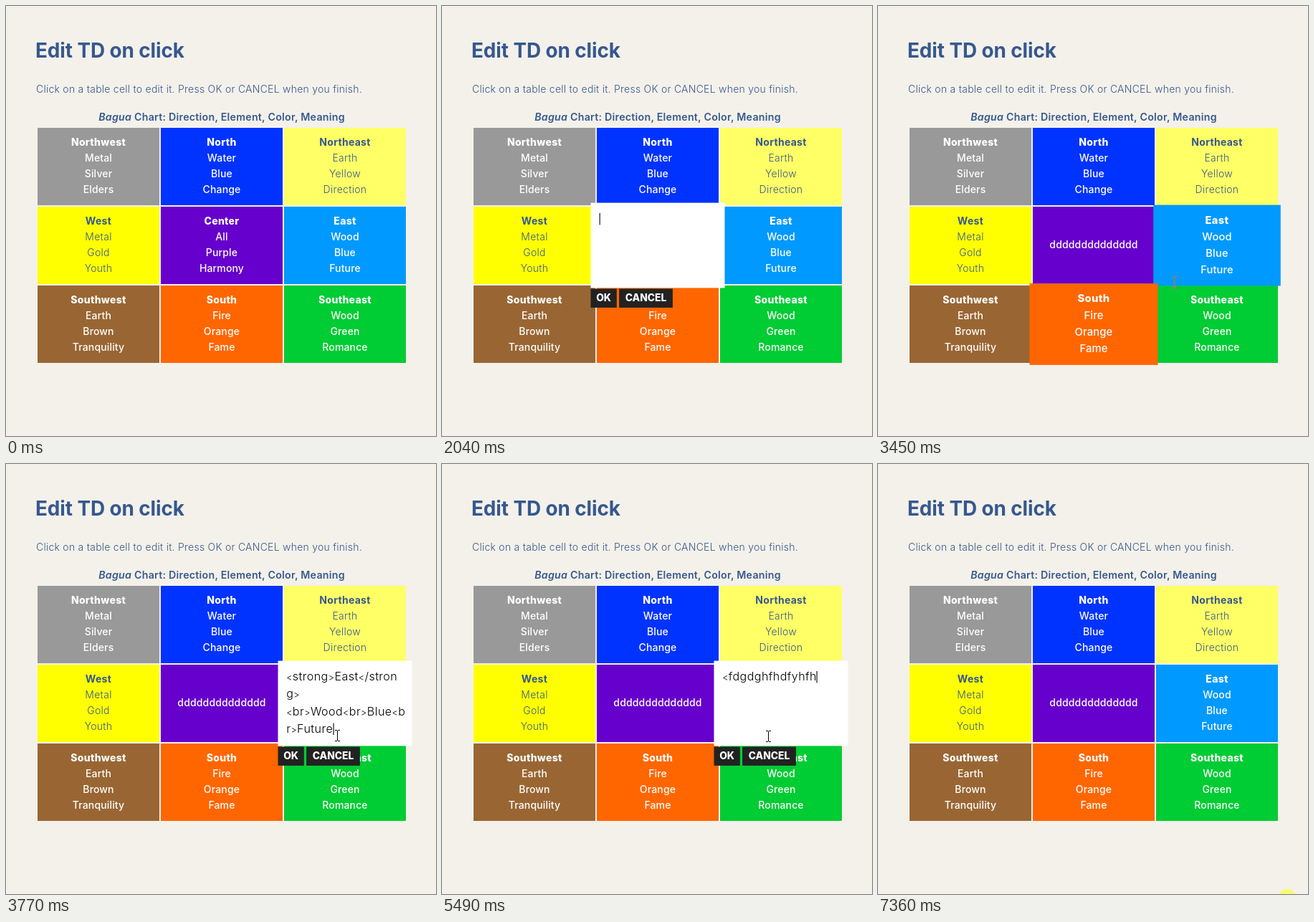
An HTML page for the animation above (7.43 s loop, 600 by 600 pixels).

```html
<!DOCTYPE html>
<html lang="en">
<head>
<meta charset="utf-8">
<title>Edit TD on click</title>
<style>
  html, body { margin: 0; width: 100%; height: 100%; overflow: hidden; background: #f4f1ea; }
  #stage {
    position: relative; width: 600px; height: 600px; overflow: hidden;
    background: #f4f1ea; color: #35588f; isolation: isolate;
    font: 300 14px/22px Inter, "Open Sans", sans-serif;
  }
  #stage > * { position: absolute; margin: 0; white-space: nowrap; }
  h1 { left: 41px; top: 42px; font-size: 27.9px; line-height: 40px; font-weight: 700; letter-spacing: -.1px; }
  .intro { left: 42px; top: 105px; letter-spacing: .245px; }
  .caption { left: 44px; top: 144px; width: 514px; text-align: center; font-size: 14.2px; font-weight: 600; letter-spacing: .26px; }
  .cell {
    width: 170px; height: 108px; box-sizing: border-box; padding-bottom: 2px;
    display: flex; flex-direction: column; justify-content: center;
    text-align: center; letter-spacing: .3px;
  }
  .cell b { font-weight: 700; letter-spacing: .3px; }
  .light { color: #fff; font-weight: 500; letter-spacing: .15px; }
  .light b { font-weight: 800; }
  #editor { width: 170px; height: 108px; transform: scale(1.1); z-index: 200; background: #fff; }
  #text { position: absolute; left: 10.6px; top: 9px; color: #000; font-size: 14.6px; letter-spacing: .4px; }
  #text div { height: 22px; }
  #text i { font-style: normal; font-size: 11.5px; }
  #text mark { background: #0078d7; color: #fff; }
  #text .wrap { padding-right: 4px; }
  #text u { display: inline-block; width: 1px; height: 15px; margin-right: -1px; background: #000; vertical-align: -3px; }
  .button {
    position: absolute; top: 108.5px; height: 24.5px; line-height: 24.5px;
    background: #222; color: #fff; font-size: 12.6px; font-weight: 800; text-align: center;
  }
  .ok { left: 0; width: 33px; }
  .cancel { left: 36px; width: 68px; }
  #stage > svg { left: 0; top: 0; z-index: 300; overflow: visible; }
  #beam { mix-blend-mode: difference; }
  #dot { left: 559px; top: 593px; width: 24px; height: 24px; border-radius: 50%; background: #fafa6e; }
</style>
</head>
<body>
<div id="stage">
  <h1>Edit TD on click</h1>
  <p class="intro">Click on a table cell to edit it. Press OK or CANCEL when you finish.</p>
  <p class="caption"><em>Bagua</em> Chart: Direction, Element, Color, Meaning</p>
  <div id="editor">
    <div id="text"></div>
    <span class="button ok">OK</span><span class="button cancel">CANCEL</span>
  </div>
  <div id="dot"></div>
  <svg id="beam" width="7" height="16"><path d="M0 .5h3M4 .5h3M3.5 1v14M0 15.5h3M4 15.5h3" fill="none" stroke="#fff"/></svg>
  <svg id="arrow" width="12" height="19"><path d="M.5.5V16.5L4.2 13 6.6 18.4 9 17.4 6.7 12H11.5Z" fill="#fff" stroke="#000"/></svg>
</div>
<script>
const LOOP = 7430, FADE = 300;
const $ = id => document.getElementById(id);
const clamp = (v, lo, hi) => Math.min(hi, Math.max(lo, v));
const show = (el, on) => { el.style.visibility = on ? 'visible' : 'hidden'; };

// name, other lines, background, light text, times at which hover flips
const CELLS = [
  ['Northwest', 'Metal Silver Elders', '#999999', 1, []],
  ['North', 'Water Blue Change', '#0033ff', 1, []],
  ['Northeast', 'Earth Yellow Direction', '#ffff66', 0, []],
  ['West', 'Metal Gold Youth', '#ffff00', 0, []],
  ['Center', 'All Purple Harmony', '#6600cc', 1, [590, 3130]],
  ['East', 'Wood Blue Future', '#0099ff', 1, [3370, 6140]],
  ['Southwest', 'Earth Brown Tranquility', '#996633', 1, []],
  ['South', 'Fire Orange Fame', '#ff6600', 1, [500, 590, 3130, 3370]],
  ['Southeast', 'Wood Green Romance', '#00cc33', 1, [6140, 6690]]
];

const cells = CELLS.map(([name, rest, color, light, flips], i) => {
  const el = document.createElement('div');
  el.className = light ? 'cell light' : 'cell';
  el.style.cssText = `left:${44 + i % 3 * 172}px;top:${170 + Math.floor(i / 3) * 110}px;background:${color}`;
  const full = `<b>${name}</b>` + rest.split(' ').map(s => `<span>${s}</span>`).join('');
  el.innerHTML = full;
  $('stage').insertBefore(el, $('editor'));
  return { el, flips, full };
});
const center = cells[4], east = cells[5];

// cursor waypoints: time, x, y
const TRACK = [
  [430, 447, 575], [510, 380, 497], [590, 318, 389], [680, 291, 369],
  [1060, 291, 369], [1230, 314, 346], [1370, 309, 354],
  [2740, 309, 354], [2960, 236, 405], [3130, 236, 406],
  [3370, 387, 394], [3580, 455, 372], [3770, 462, 379], [3820, 466, 394], [3880, 466, 409],
  [4020, 466, 409], [4300, 453, 372], [4580, 395, 300],
  [5300, 395, 300], [5470, 455, 380], [5650, 455, 380], [5800, 458, 405], [5820, 459, 406],
  [6540, 459, 407], [6700, 530, 503], [6850, 560, 560], [7060, 571, 606]
];

const CENTER = ['<strong>Center</str', 'ong>', '<br>All<br>Purple<br', '>Harmony'];
const EAST = ['<strong>East</stron', 'g>', '<br>Wood<br>Blue<b', 'r>Future'];
const TYPED = 'fdgdghfhdfyhfhdgf';
const keyTime = i => i < 3 ? 4640 + 60 * i : i < 6 ? 4860 + 30 * (i - 3) : 5080 + 56 * (i - 6);

// the CSS "ease" curve
function ease(x) {
  if (x <= 0) return 0;
  if (x >= 1) return 1;
  let lo = 0, hi = 1, s = .5;
  for (let i = 0; i < 24; i++) {
    s = (lo + hi) / 2;
    const px = .75 * s * (1 - s) * (1 - s) + .75 * s * s * (1 - s) + s * s * s;
    if (px < x) lo = s; else hi = s;
  }
  return .3 * s * (1 - s) * (1 - s) + 3 * s * s * (1 - s) + s * s * s;
}

function hover(flips, t) {
  let v = 0;
  flips.forEach((start, i) => {
    if (t < start) return;
    const end = Math.min(t, flips[i + 1] || LOOP);
    const to = i % 2 ? 0 : 1, span = Math.abs(to - v);
    if (span) v += (to - v) * ease((end - start) / (FADE * span));
  });
  return v;
}

function cursorAt(t) {
  const i = TRACK.findIndex(p => p[0] > t);
  if (i < 1) return TRACK[i < 0 ? TRACK.length - 1 : 0].slice(1);
  const [ta, xa, ya] = TRACK[i - 1], [tb, xb, yb] = TRACK[i];
  const k = (t - ta) / (tb - ta);
  return [Math.round(xa + (xb - xa) * k), Math.round(ya + (yb - ya) * k)];
}

const markup = s => s.replace(/[<>]/g, c => `<i>${c === '<' ? '&lt;' : '&gt;'}</i>`);

// sel: [line, column] where a selection up to the end begins
function textHtml(lines, caret, sel) {
  const last = lines.length - 1;
  return lines.map((s, i) => {
    let html = markup(s);
    if (sel && i >= sel[0]) {
      const col = i === sel[0] ? sel[1] : 0;
      html = markup(s.slice(0, col)) + `<mark${i < last ? ' class="wrap"' : ''}>${markup(s.slice(col))}</mark>`;
    }
    return `<div>${html}${caret && i === last ? '<u></u>' : ''}</div>`;
  }).join('');
}

function centerText(t) {
  if (t < 1650) return textHtml(CENTER, t < 1360);
  if (t < 1970) return textHtml(CENTER, false, [0, 0]);
  return textHtml(['d'.repeat(clamp(Math.floor((t - 2290) / 30), 0, 14))], true);
}

function eastText(t, x, y) {
  if (t < 4300) return textHtml(EAST, true);
  if (t < keyTime(0)) {
    const line = clamp(Math.floor((y - 286) / 24.2), 0, 3);
    const col = clamp(Math.round((x - 392) / 8.2), line ? 0 : 1, EAST[line].length);
    return textHtml(EAST, false, [line, col]);
  }
  const typed = [...TYPED].filter((c, i) => keyTime(i) <= t).join('');
  return textHtml(['<' + typed], t < 5810);
}

function setHtml(el, html) {
  if (el.last !== html) el.innerHTML = el.last = html;
}

function render(t) {
  const [x, y] = cursorAt(t);
  const inCenter = t >= 860 && t < 3100, inEast = t >= 3700 && t < 6140;
  const edited = inCenter ? center : inEast ? east : null;

  cells.forEach(cell => {
    const v = hover(cell.flips, t);
    cell.el.style.transform = v ? `scale(${1 + .1 * v})` : 'none';
    cell.el.style.zIndex = Math.round(v * 100);
    show(cell.el, cell !== edited);
  });
  setHtml(center.el, t < 3100 ? center.full : 'd'.repeat(14));

  show($('editor'), edited);
  if (edited) {
    $('editor').style.left = edited.el.style.left;
    $('editor').style.top = edited.el.style.top;
    setHtml($('text'), inCenter ? centerText(t) : eastText(t, x, y));
  }

  const seen = t >= 430 && t < 7060 && !(t >= 1800 && t < 2740);
  const pointing = y > 498 || (edited && y > 393);
  show($('arrow'), seen && pointing);
  show($('beam'), seen && !pointing);
  $('arrow').style.transform = `translate(${x}px,${y}px)`;
  $('beam').style.transform = `translate(${x - 3}px,${y - 8}px)`;
  show($('dot'), t >= 7360);
}

let start;
function tick(now) {
  if (start === undefined) start = now;
  render((now - start) % LOOP);
  requestAnimationFrame(tick);
}
render(0);
requestAnimationFrame(tick);
</script>
</body>
</html>
```
